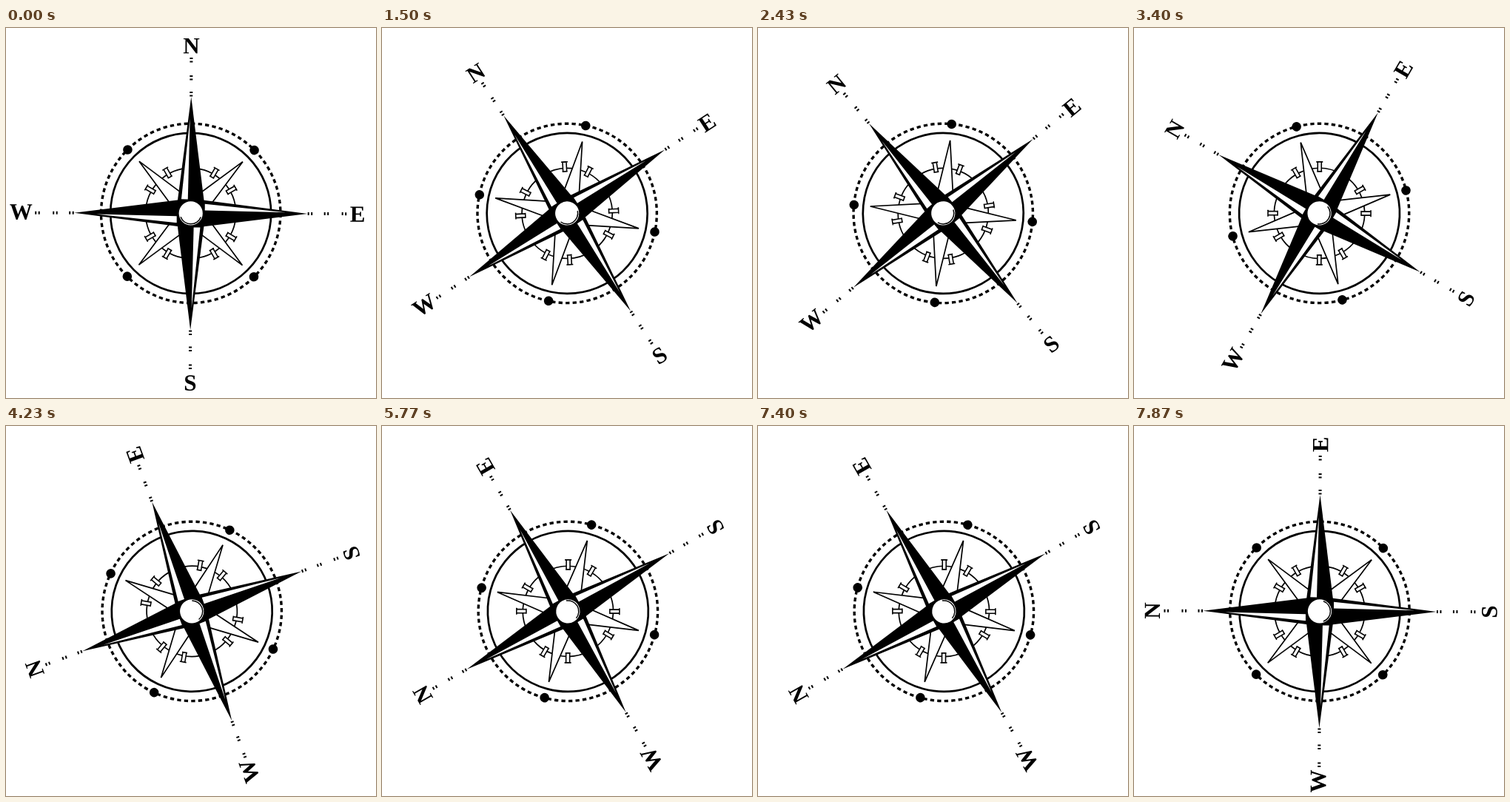
Write an HTML page that moves like this. It is 500x500 px and loops after 8000 ms.

```html
<!DOCTYPE html>
<html lang="en">
<head>
<meta charset="utf-8">
<title>Compass</title>
<style>
  html, body { margin: 0; width: 100%; height: 100%; overflow: hidden; background: #fff; }
  svg { display: block; width: 100%; height: 100%; }
  text { font: bold 31px "Liberation Serif", "Noto Serif", serif; text-anchor: middle; }
</style>
</head>
<body>
<svg viewBox="0 0 500 500">
  <defs>
    <g id="ray">
      <path d="M0-157.500L18-16L0 0L-18-16Z"/>
      <path d="M-1.500-128L-12.800-19L-4-19Z" fill="#fff"/>
      <path d="M0-158v-2M0-162.500v-2M0-180v-2M0-184.500v-2M0-204v-2M0-208.500v-2" stroke="#000" stroke-width="4"/>
    </g>
    <g id="spike" stroke="#000" stroke-width="1.700" fill="#fff">
      <path d="M-11-25L0-99L11-25"/>
    </g>
    <g id="tab" stroke="#000" stroke-width="1.600" fill="#fff">
      <path d="M-2.500-69.500h5v13h-5zM-4.500-69.500h9M-3.500-56.500h7"/>
    </g>
    <g id="compass">
      <circle r="121.200" fill="none" stroke="#000" stroke-width="3.400" pathLength="800" stroke-dasharray="5.6 4.4"/>
      <circle r="108.500" fill="none" stroke="#000" stroke-width="2.700"/>
      <circle r="61" fill="none" stroke="#000" stroke-width="1.700"/>
      <g id="parts"></g>
      <circle r="17" fill="#fff" stroke="#000" stroke-width="1.800"/>
      <path d="M-13.600 5A14.500 14.500 0 0 0 13.600 5" fill="none" stroke="#000" stroke-width="1.500"/>
      <text x="0" y="-216">N</text>
      <text x="225.500" y="10.500">E</text>
      <text x="0" y="239.500">S</text>
      <text x="-229.500" y="9">W</text>
    </g>
  </defs>
  <rect width="500" height="500" fill="#fff"/>
  <use id="turning" href="#compass"/>
  <g id="opening">
    <rect width="500" height="500" fill="#fff"/>
    <use id="still" href="#compass"/>
  </g>
</svg>
<script>
const LOOP = 8000, FPS = 30, SWING = 15;
// Each swing: starting tick, angle before, angle after (counter-clockwise).
const swings = [
  [41, 30, 60], [65, 60, 30], [95, 30, 90], [119, 90, 120],
  [173, 120, 90], [197, 90, 120], [221, 120, 90]
];
const byId = id => document.getElementById(id);
const clamp = v => Math.max(0, Math.min(1, v));
const ease = p => p < .5 ? 4 * p ** 3 : 1 - 4 * (1 - p) ** 3;

const place = (id, angle) => `<use href="#${id}" transform="rotate(${angle})"/>`;
const quarters = [0, 90, 180, 270];
byId('parts').innerHTML =
  quarters.map(q => place('spike', q + 45)).join('') +
  quarters.map(q => place('tab', q + 30) + place('tab', q + 60)).join('') +
  quarters.map(q => place('ray', q)).join('') +
  quarters.map(q => {
    const a = (q + 45) * Math.PI / 180;
    return `<circle cx="${121 * Math.cos(a)}" cy="${121 * Math.sin(a)}" r="6.3"/>`;
  }).join('');

function angleAt(tick) {
  let angle = swings[0][1];
  for (const [start, from, to] of swings) {
    if (tick >= start) angle = from + (to - from) * ease(clamp((tick - start + .5) / SWING));
  }
  return angle;
}

// The pivot drifts slightly to the right as the dial turns.
function pose(id, angle) {
  byId(id).setAttribute('transform',
    `translate(${249.7 + angle * .014} 250.4) rotate(${.2 - angle})`);
}

function draw(ms) {
  const tick = Math.floor((ms % LOOP + 3.4) * FPS / 1000);
  pose('turning', angleAt(tick));
  byId('opening').setAttribute('opacity', 1 - clamp((tick - 21) / 6));
}

pose('still', 0);
const begin = performance.now();
function loop() {
  draw(performance.now() - begin);
  requestAnimationFrame(loop);
}
loop();
</script>
</body>
</html>
```
